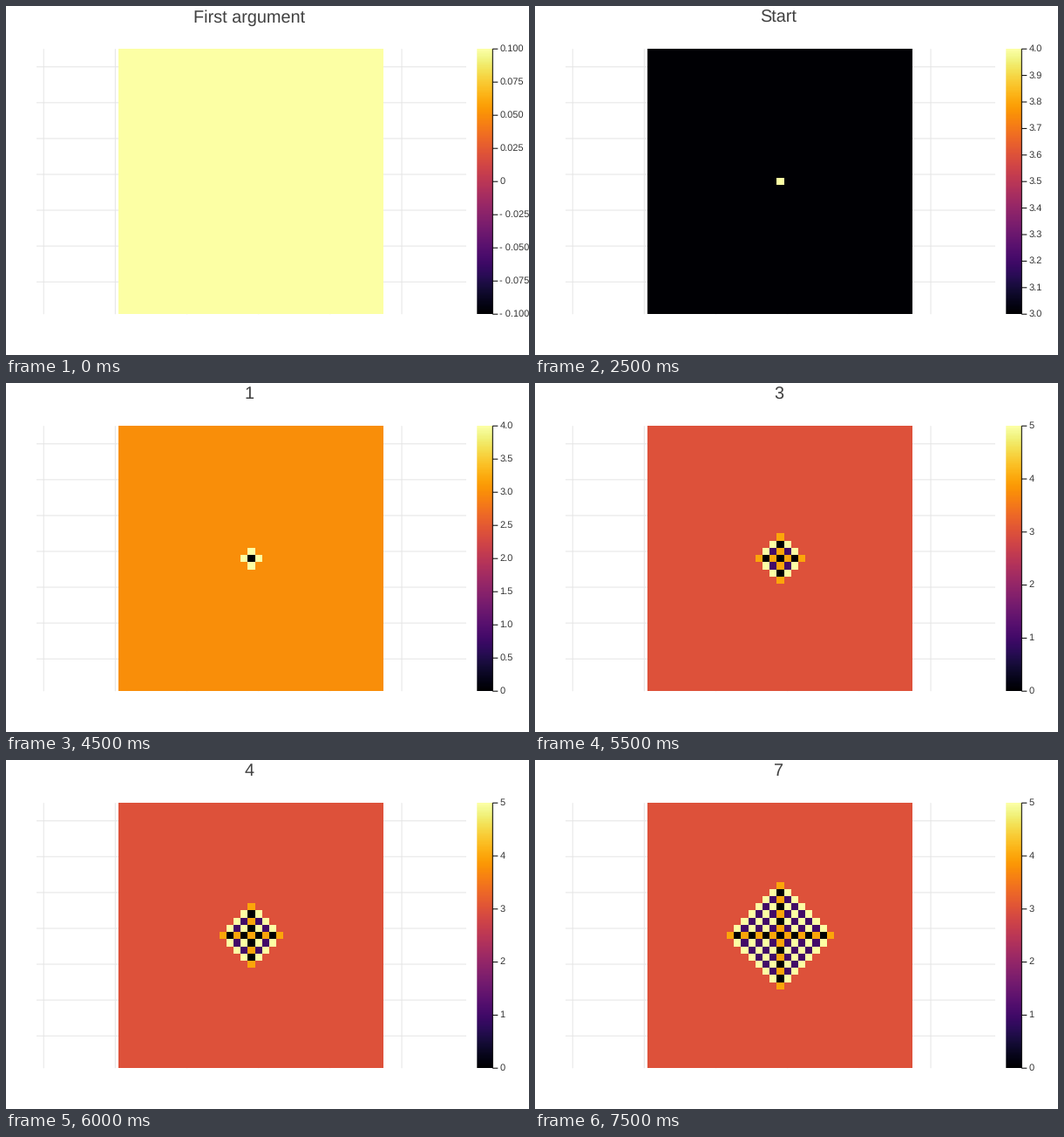
Animation of 600x400 px, one loop 8 s. Source, as a matplotlib script:

```python
import numpy as np
import matplotlib.pyplot as plt
from matplotlib.animation import FuncAnimation

W, H, DPI = 600, 400, 100
PX = 72 / DPI  # points per pixel
N = 37
LEFT, TOP, SIDE = 129.48, 49.2, 304
CELL = SIDE / N
BAR_X0, BAR_X1 = 540.3, 558.3

plt.rcParams["font.family"] = "Liberation Sans"
plt.rcParams["text.hinting"] = "none"
plt.rcParams["lines.solid_capstyle"] = "butt"


def topple(pile):
    """Topple every unstable cell once, all at the same time."""
    hot = np.pad((pile >= 4).astype(int), 1)
    gain = hot[:-2, 1:-1] + hot[2:, 1:-1] + hot[1:-1, :-2] + hot[1:-1, 2:]
    return pile - 4 * hot[1:-1, 1:-1] + gain


def tick_label(value, digits):
    if abs(value) < 1e-9:
        return "0"
    return ("- " if value < 0 else "") + f"{abs(value):.{digits}f}"


def make_scenes():
    """Scenes as (title, grid, low, high, tick count, digits), one per half second."""
    flat = np.full((N, N), 3)
    grain = np.zeros((N, N), int)
    grain[N // 2, N // 2] = 1
    pile = flat + grain
    scenes = [("First argument", flat, -0.1, 0.1, 9, 3)]
    scenes += [("Second argument", grain, 0, 1, 11, 1)] * 4
    scenes += [("Start", pile, 3, 4, 11, 1)] * 4
    for step in range(1, 8):
        pile = topple(pile)
        scale = (0, 4, 9, 1) if step == 1 else (0, 5, 6, 0)
        scenes.append((str(step), pile, *scale))
    return scenes


scenes = make_scenes()

fig = plt.figure(figsize=(W / DPI, H / DPI), dpi=DPI, facecolor="white")
ax = fig.add_axes([0, 0, 1, 1])
ax.set_xlim(0, W)
ax.set_ylim(H, 0)
ax.set_autoscale_on(False)
ax.axis("off")


def line(xs, ys, color, zorder):
    return ax.plot(xs, ys, color=color, lw=PX, zorder=zorder, snap=False)[0]


# Grid lines behind the heatmap
for k in range(-10, 41, 10):
    x = LEFT + (k - 0.5) * CELL
    line([x, x], [TOP, TOP + SIDE], "#e5e5e5", 1)
for k in range(5, 36, 5):
    y = TOP + SIDE - (k - 0.5) * CELL
    line([35, 528], [y, y], "#e5e5e5", 1)

edges = np.arange(N + 1) * CELL
mesh = ax.pcolormesh(np.floor(LEFT + edges + 0.5), np.floor(TOP + edges + 0.5),
                     scenes[0][1], cmap="inferno", antialiased=False, zorder=2)

# Colour bar
rows = np.floor(TOP) + np.arange(SIDE + 1)
ax.pcolormesh([BAR_X0, BAR_X1], rows, np.linspace(1, 0, SIDE)[:, None],
              cmap="inferno", antialiased=True, snap=False, zorder=2)
line([BAR_X1, BAR_X1], [TOP, TOP + SIDE], "black", 3)

title = ax.text(279.5, 18.5, "", size=19.9 * PX, color="#404040",
                ha="center", va="baseline")
marks = [line([], [], "black", 3) for _ in range(11)]
labels = [ax.text(566.5, 0, "", size=11 * PX, color="#333333", va="baseline")
          for _ in range(11)]


def draw(i):
    name, grid, low, high, count, digits = scenes[i]
    title.set_text(name)
    mesh.set_array(grid)
    mesh.set_clim(low, high)
    for k, (mark, label) in enumerate(zip(marks, labels)):
        shown = k < count
        mark.set_visible(shown)
        label.set_visible(shown)
        if shown:
            part = k / (count - 1)
            y = TOP + (1 - part) * SIDE
            mark.set_data([BAR_X1, BAR_X1 + 6], [y, y])
            label.set_y(y + 2.8)
            label.set_text(tick_label(low + part * (high - low), digits))
    return [title, mesh, *marks, *labels]


anim = FuncAnimation(fig, draw, frames=len(scenes), interval=500,
                     repeat=True, repeat_delay=0, blit=False)
plt.show()
```
